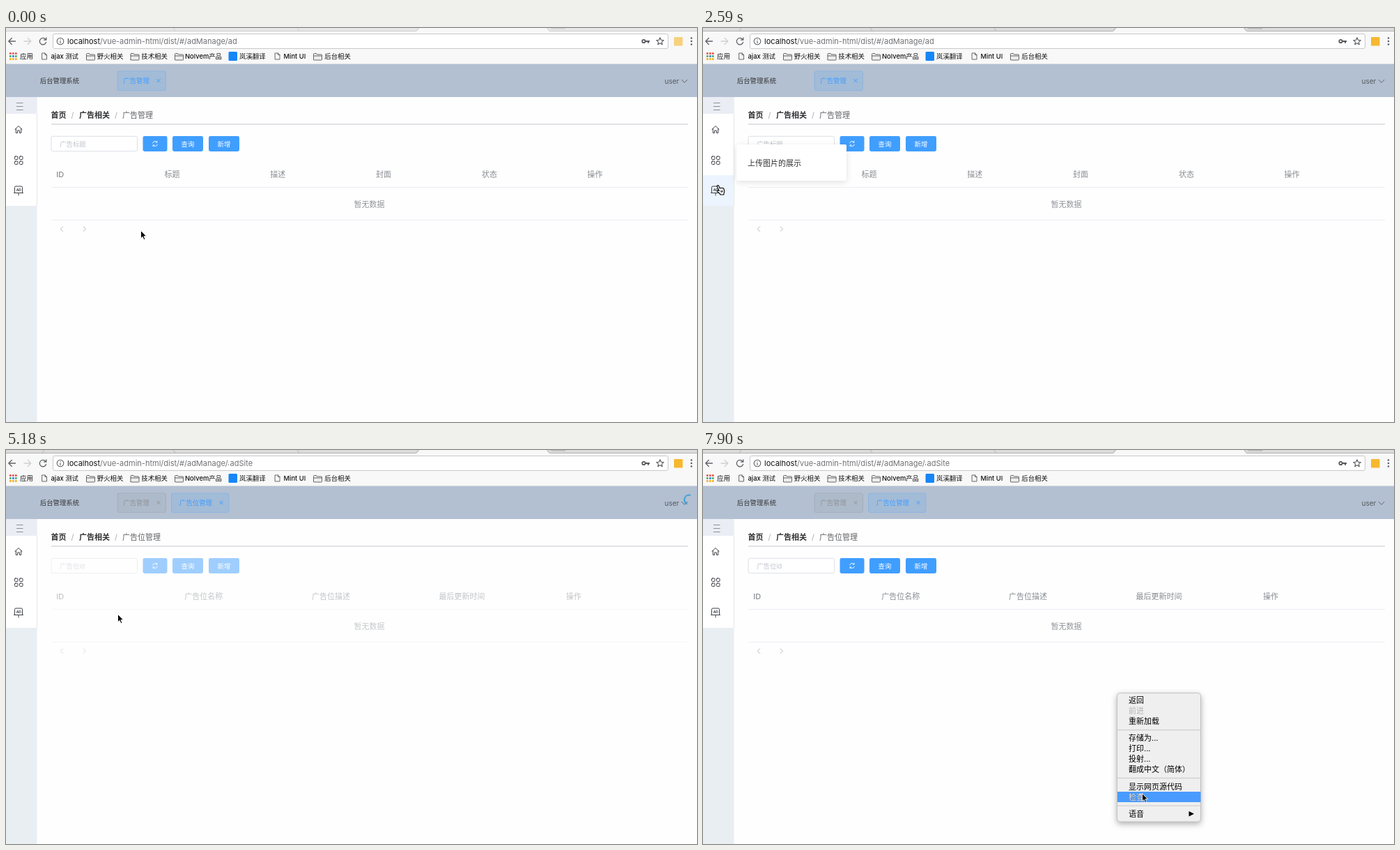
Write an HTML page that moves like this. It is 992 px wide and 565 px high and loops after 8000 ms.

```html
<!DOCTYPE html>
<html lang="zh-CN">
<head>
<meta charset="utf-8">
<title>后台管理系统</title>
<style>
html, body { margin: 0; width: 100%; height: 100%; overflow: hidden; background: #fefefe; }
svg { display: block; width: 992px; height: 565px; }
text { font: 11px Inter, "Noto Sans CJK SC", "Noto Sans CJK", sans-serif; white-space: pre; }
.s text, text.s { font-size: 9.4px; }
.m text, text.m { font-weight: 500; }
text.b { font-weight: 700; fill: #303133; }
.line { fill: none; stroke-linecap: round; stroke-linejoin: round; }

/* One 8 s timeline; every change is a hard step. */
.t { animation: 8s step-end infinite; }
.wake { animation-name: wake; }
.before { animation-name: before; }
.after { animation-name: after; }
.list-a { animation-name: list-a; }
.list-b { animation-name: list-b; }
.tab-b { animation-name: tab-b; }
.tip { animation-name: tip; }
.hov1 { animation-name: hov1; }
.hov2 { animation-name: hov2; }
.hov3 { animation-name: hov3; }
.pop2 { animation-name: pop2; }
.pop3 { animation-name: pop3; transform-origin: 77px 211px; }
.spin { animation-name: spin; transform-origin: 980px 71px; }
.menu { animation-name: menu; }
.pick { animation-name: pick; }
.cursor { animation-name: cursor; }
.arrow { animation-name: arrow; }
.hand { animation-name: hand; }
.pop { filter: drop-shadow(0 2px 4px rgba(0, 0, 0, .12)); }
.sheet { filter: drop-shadow(0 3px 4px rgba(0, 0, 0, .3)); }

@keyframes wake { 0% { opacity: .6 } 1.875% { opacity: .8 } 4.5% { opacity: 1 } }
@keyframes before { 0% { opacity: 1 } 60.375%, 100% { opacity: 0 } }
@keyframes after { 0% { opacity: 0 } 60.375%, 100% { opacity: 1 } }
@keyframes list-a { 0% { opacity: 1 } 60.375% { opacity: .95 } 62.125% { opacity: .5 } 64%, 100% { opacity: 0 } }
@keyframes list-b { 0% { opacity: 0 } 64% { opacity: .5 } 65.875%, 100% { opacity: 1 } }
@keyframes tab-b { 0% { opacity: 0 } 62.125%, 100% { opacity: 1 } }
@keyframes tip { 0% { opacity: 0 } 17.5% { opacity: 1 } 24.875%, 100% { opacity: 0 } }
@keyframes hov1 { 0% { opacity: 0 } 23% { opacity: 1 } 24.875%, 100% { opacity: 0 } }
@keyframes hov2 { 0% { opacity: 0 } 24.875% { opacity: 1 } 30.5%, 100% { opacity: 0 } }
@keyframes hov3 { 0% { opacity: 0 } 30.5% { opacity: 1 } 43.5%, 100% { opacity: 0 } }
@keyframes pop2 { 0% { opacity: 0 } 24.875% { opacity: .6 } 26.75% { opacity: 1 } 36% { opacity: .4 } 37.875%, 100% { opacity: 0 } }
@keyframes pop3 {
  0% { opacity: 0; transform: none }
  36% { opacity: .6; transform: scale(.77) }
  37.875% { opacity: 1; transform: none }
  60.375% { opacity: .6; transform: scale(.77) }
  62.125%, 100% { opacity: 0; transform: none }
}
@keyframes spin {
  0% { opacity: 0; transform: rotate(0) }
  60.375% { opacity: 1; transform: rotate(0) }
  62.125% { opacity: 1; transform: rotate(126deg) }
  64% { opacity: 1; transform: rotate(261deg) }
  65.875% { opacity: 1; transform: rotate(36deg) }
  67.75%, 100% { opacity: 0; transform: rotate(0) }
}
@keyframes menu { 0% { opacity: 0 } 85.625%, 100% { opacity: 1 } }
@keyframes pick {
  0% { transform: translateY(-600px) }
  89.375% { transform: translateY(352px) }
  91.25% { transform: translateY(382px) }
  93.125% { transform: translateY(421px) }
  95% { transform: translateY(451px) }
  96.875% { transform: translateY(475px) }
  98.75%, 100% { transform: translateY(490px) }
}
@keyframes cursor {
  0% { transform: translate(193px, 290px) }
  8.125% { transform: translate(198px, 304px) }
  10% { transform: translate(172px, 270px) }
  11.875% { transform: translate(120px, 222px) }
  13.75% { transform: translate(70px, 182px) }
  15.625% { transform: translate(34px, 156px) }
  17.5% { transform: translate(18px, 144px) }
  19.375% { transform: translate(15px, 142px) }
  23% { transform: translate(19px, 189px) }
  24.875% { transform: translate(19px, 190px) }
  26.75% { transform: translate(20px, 195px) }
  28.625% { transform: translate(20px, 204px) }
  30.5% { transform: translate(19px, 216px) }
  32.375% { transform: translate(19px, 225px) }
  41.625% { transform: translate(45px, 229px) }
  43.5% { transform: translate(80px, 229px) }
  45.375% { transform: translate(95px, 228px) }
  62.125% { transform: translate(105px, 229px) }
  64% { transform: translate(160px, 235px) }
  65.875% { transform: translate(235px, 243px) }
  67.75% { transform: translate(315px, 249px) }
  70.625% { transform: translate(361px, 251px) }
  72.5% { transform: translate(418px, 252px) }
  76.25% { transform: translate(470px, 278px) }
  78.125% { transform: translate(550px, 328px) }
  80% { transform: translate(591px, 350px) }
  89.375% { transform: translate(603px, 357px) }
  91.25% { transform: translate(612px, 384px) }
  93.125% { transform: translate(620px, 424px) }
  95% { transform: translate(626px, 455px) }
  96.875% { transform: translate(629px, 478px) }
  98.75%, 100% { transform: translate(630px, 492px) }
}
@keyframes arrow { 0% { opacity: 1 } 17.5% { opacity: 0 } 64%, 100% { opacity: 1 } }
@keyframes hand { 0% { opacity: 0 } 17.5% { opacity: 1 } 64%, 100% { opacity: 0 } }
</style>
</head>
<body>
<svg viewBox="0 0 992 565">
<defs>
  <g id="folder" class="line" stroke="#666"><path fill="#eee" d="M.5 9.5v-8q0-1 1-1h3l1 1.5h6q1 0 1 1v6.5q0 .5-1 .5h-10q-1 0-1-.5z"/><path d="M.5 4h12"/></g>
  <path id="doc" class="line" stroke="#666" d="M.5.5h4l2.500 2.500v6.500h-6.500zM4.500.5v2.500h2.500"/>
  <path id="x" class="line" d="M-2.300-2.300l4.600 4.600M2.300-2.300l-4.600 4.600"/>
  <g id="tools">
    <rect x="65" y="155.300" width="123.500" height="21.400" rx="2.500" fill="#fff" stroke="#dcdfe6"/>
    <g fill="#409eff"><rect x="196.500" y="155" width="35" height="22" rx="2.400"/><rect x="239" y="155" width="44" height="22" rx="2.400"/><rect x="291" y="155" width="44" height="22" rx="2.400"/></g>
    <path class="line" stroke="#fff" stroke-width=".9" d="M210.700 165a3.400 3.400 0 0 1 6-1.200M216.900 162.300v1.800h-1.800M217.300 167a3.400 3.400 0 0 1-6 1.200M211.100 169.700v-1.800h1.800"/>
    <g class="s m" fill="#fff"><text x="251.600" y="169.500">查询</text><text x="303.600" y="169.500">新增</text></g>
    <path stroke="#ebeef5" d="M65 228.500h914M65 275.500h914"/>
    <text x="499.500" y="256.900" fill="#909399">暂无数据</text>
    <path class="line" stroke="#b4b8c0" d="M81.500 285l-3.200 3.300 3.200 3.300M111.200 285l3.200 3.300-3.200 3.300"/>
  </g>
  <clipPath id="band"><rect class="t pick" x="594" width="121" height="15"/></clipPath>
</defs>

<rect width="992" height="565" fill="#fefefe"/>

<!-- browser -->
<rect width="992" height="52" fill="#f8f8f8"/>
<g class="t wake">
  <path fill="#dcdcdc" d="M0 0h594l-4 4.500H0zM776 0h216v4.500H780z"/>
  <path class="line" stroke="#b4b4b4" d="M0 4.500h588q2 0 4-4.500M992 4.500H781q-2 0-4-4.500M52 4l3-4M240 0l3 4M418 0l3 4"/>
  <path class="line" fill="#e8e8e8" stroke="#b4b4b4" d="M782 0h19l2 1h-19z"/>
</g>
<g class="line" stroke="#5f6368" stroke-width="1.300">
  <path d="M13.500 19h-9.500M8.300 14.500L3.800 19l4.500 4.500"/>
  <path stroke="#d0d0d0" d="M26 19h9.500M31.200 14.500l4.500 4.500-4.500 4.500"/>
  <path d="M56.800 16.300a4.700 4.700 0 1 0 .8 4M57.800 13.800v3.300h-3.300"/>
</g>
<rect x="67.500" y="8.500" width="883" height="21" rx="2.500" fill="#fff" stroke="#c9c9c9"/>
<g class="line" stroke="#5f6368" stroke-width="1.100"><circle cx="78" cy="19" r="4.800"/><path d="M78 18.500v3M78 16.300v.1"/></g>
<text x="88" y="23" fill="#707276"><tspan fill="#111">localhost</tspan>/vue-admin-html/dist/#/adManage/ad<tspan class="t after"></tspan></text>
<g class="t after"><rect x="320" y="11" width="40" height="16" fill="#fff"/><text x="321.500" y="23" fill="#707276">adSite</text></g>
<g fill="none" stroke="#55585c"><circle cx="915.500" cy="19" r="2.200" stroke-width="1.800"/><path stroke-width="1.900" d="M918 19h6M922 19v2.800"/>
  <path class="line" stroke-width="1.100" d="M939 13.800l1.500 3.400 3.700.4-2.800 2.500.8 3.600-3.200-1.900-3.200 1.900.8-3.600-2.800-2.500 3.700-.4z"/></g>
<rect class="t wake" x="959" y="13" width="12.500" height="12.500" rx="1" fill="#f6b82e"/>
<g fill="#5f6368"><circle cx="984" cy="14.500" r="1.300"/><circle cx="984" cy="19" r="1.300"/><circle cx="984" cy="23.500" r="1.300"/></g>

<g><path stroke="#e8453c" stroke-width="2.600" stroke-dasharray="2.600 1.400" d="M5 36.500h11"/><path stroke="#3aa757" stroke-width="2.600" stroke-dasharray="2.600 1.400" d="M5 40.500h11"/><path stroke="#f2a60c" stroke-width="2.600" stroke-dasharray="2.600 1.400" d="M5 44.500h11"/><path stroke="#4285f4" stroke-width="2.600" d="M9 40.500h2.600"/></g>
<use href="#doc" x="51.500" y="35.500"/><use href="#doc" x="386" y="35.500"/>
<use href="#folder" x="115" y="36"/><use href="#folder" x="178.500" y="36"/><use href="#folder" x="242" y="36"/><use href="#folder" x="441" y="36"/>
<rect x="319.500" y="34" width="12.500" height="13" rx="1.500" fill="#1686f8"/>
<g class="s m" fill="#111">
  <text x="20" y="44.200">应用</text><text x="64.500" y="44.200">ajax 测试</text><text x="130.800" y="44.200">野火相关</text>
  <text x="194.300" y="44.200">技术相关</text><text x="257" y="44.200">Nolvem产品</text><text x="335" y="44.200">岚溪翻译</text>
  <text x="398.500" y="44.200">Mint UI</text><text x="457.300" y="44.200">后台相关</text>
</g>

<!-- header -->
<rect y="51.500" width="992" height="47.500" fill="#b3c0d1"/>
<text class="s" x="48.800" y="79" fill="#333">后台管理系统</text>
<g class="t before" fill="#409eff" stroke="#409eff">
  <rect x="160" y="62" width="69.500" height="27.500" rx="2.500" fill-opacity=".14" stroke-opacity=".28"/>
  <text class="s" x="168.300" y="79" stroke="none">广告管理</text><use href="#x" x="219" y="75.500"/>
</g>
<g class="t after" fill="#909399" stroke="#909399">
  <rect x="160" y="62" width="69.500" height="27.500" rx="2.500" fill-opacity=".14" stroke-opacity=".32"/>
  <text class="s" x="168.300" y="79" stroke="none">广告管理</text><use href="#x" x="219" y="75.500"/>
</g>
<g class="t tab-b" fill="#409eff" stroke="#409eff">
  <rect x="237.500" y="62" width="82.500" height="27.500" rx="2.500" fill-opacity=".14" stroke-opacity=".28"/>
  <text class="s" x="249" y="79" stroke="none">广告位管理</text><use href="#x" x="309" y="75.500"/>
</g>
<text x="945.500" y="79.800" fill="#55595f" style="font-size:10px">user</text>
<path class="line" stroke="#606266" d="M970 74.300l4 4 4-4"/>
<path class="line t spin" stroke="#2299dd" stroke-width="1.700" d="M974.300 67.500A6.700 6.700 0 0 1 985.900 74"/>

<!-- sidebar -->
<rect y="99" width="44.500" height="466" fill="#e9eef3"/>
<rect y="99" width="44.500" height="24" fill="#eaedf4"/>
<path stroke="#8b8f96" d="M15 107.500h9.500M15 112.500h9.500M15 117.500h9.500"/>
<rect y="123" width="44.500" height="132" fill="#fff"/>
<rect class="t hov1" y="123" width="44.500" height="44" fill="#ecf3ff"/>
<rect class="t hov2" y="167" width="44.500" height="44" fill="#ecf5ff"/>
<rect class="t hov3" y="211" width="44.500" height="44" fill="#ecf5ff"/>
<path stroke="#e6e6e6" d="M44.500 123v132"/>
<g class="line" stroke="#3c3f45">
  <path d="M12.800 145.500l5.200-5 5.200 5M14.300 144.500v6h2.300v-3.500h2.800v3.500h2.300v-6"/>
  <rect x="12.500" y="184" width="4.500" height="4.500" rx="1"/><rect x="19.500" y="184" width="4.500" height="4.500" rx="1"/>
  <rect x="12.500" y="191" width="4.500" height="4.500" rx="1"/><rect x="19.500" y="191" width="4.500" height="4.500" rx="1"/>
  <path d="M12.500 235.500v-7q0-1.500 1.500-1.500h8q1.500 0 1.500 1.500v7M11.500 236.500h13M18 237v3"/>
</g>
<text x="14.700" y="233.500" fill="#3c3f45" style="font-size:4.800px;font-weight:700">AD</text>

<!-- page -->
<g><text class="b" x="64.500" y="128.700">首页</text><text class="b" x="105" y="128.700">广告相关</text>
  <g fill="#a9adb5"><text x="93.500" y="128.500">/</text><text x="156" y="128.500">/</text></g>
  <g fill="#606266"><text class="t before" x="167" y="128.700">广告管理</text><text class="t after" x="167" y="128.700">广告位管理</text></g>
  <path stroke="#d6d8dc" stroke-width="1.300" d="M65 138h914"/></g>

<g class="t list-a">
  <use href="#tools"/>
  <text class="s" x="77.200" y="169.500" fill="#c0c4cc">广告标题</text>
  <g class="m" fill="#888b91"><text x="72.300" y="214.300" font-weight="600">ID</text><text x="227.500" y="214.300">标题</text><text x="379.300" y="214.300">描述</text><text x="531" y="214.300">封面</text><text x="683" y="214.300">状态</text><text x="834.500" y="214.300">操作</text></g>
</g>
<g class="t list-b">
  <use href="#tools"/>
  <text class="s" x="77.200" y="169.500" fill="#c0c4cc">广告位id</text>
  <g class="m" fill="#888b91"><text x="72.300" y="214.300">ID</text><text x="256.300" y="214.300">广告位名称</text><text x="439" y="214.300">广告位描述</text><text x="621.500" y="214.300">最后更新时间</text><text x="804" y="214.300">操作</text></g>
</g>

<!-- flyouts -->
<g class="t tip"><path fill="#303133" d="M49 145l4.500-4.500v9z"/><rect x="53" y="131.500" width="35" height="26.500" rx="3" fill="#303133"/><text class="s" x="61.200" y="148.500" fill="#fff">前言</text></g>
<g class="t pop2"><rect class="pop" x="48" y="167" width="158" height="52" rx="2" fill="#fff"/><text x="64" y="197.900" fill="#303133">上传图片的展示</text></g>
<g class="t pop3"><rect class="pop" x="48" y="211" width="158" height="96" rx="2" fill="#fff"/><text x="64" y="241.400" fill="#303133">广告位管理</text><text x="64" y="285.400" fill="#409eff">广告管理</text></g>

<!-- context menu -->
<g class="t menu">
  <rect class="sheet" x="594.500" y="348.500" width="120" height="184.500" rx="4" fill="#efefef" stroke="#c2c2c2"/>
  <path stroke="#d2d2d2" stroke-width="1.300" d="M595 401.500h119M595 470.500h119M595 510.200h119"/>
  <rect class="t pick" x="595" width="119.500" height="15" fill="#4a9bff"/>
  <text x="611" y="377.800" fill="#b3b3b3">前进</text>
  <g id="items">
    <text x="611" y="363">返回</text><text x="611" y="393">重新加载</text>
    <text x="611" y="417.300">存储为...</text><text x="611" y="432.300">打印...</text><text x="611" y="447.300">投射...</text><text x="611" y="462.200">翻成中文（简体）</text>
    <text x="611" y="486.600">显示网页源代码</text><text x="611" y="501.500">检查</text>
    <text x="611" y="526">语音</text><path d="M697.500 518l7.500 3.800-7.500 3.800z"/>
  </g>
  <g clip-path="url(#band)"><use href="#items" fill="#fff"/></g>
</g>

<g class="t cursor" stroke-linejoin="round">
  <path class="t arrow" fill="#000" stroke="#fff" stroke-width=".9" d="M.5.5v11.300l2.600-2.400 1.800 4.200 1.900-.8-1.800-4.100h3.500z"/>
  <path class="t hand" fill="#fff" stroke="#000" stroke-width="1.100" d="M4.200 8.600L1.300 2.600Q.8 1 2 .7q1.100-.2 1.600.9l1.600 3.300q.7-1 1.800-.3.900-.8 1.900.1 1.300-.6 1.900.8l.8 3q.4 2.200-.7 3.800l-.1 1.700H5.800l-.6-1.500-3.600-2.900q-.9-1.100.1-1.600 1-.5 2.500.6zM6.700 8.200l.8 2.600M8.600 7.800l.7 2.500"/>
</g>
</svg>
</body>
</html>
```
